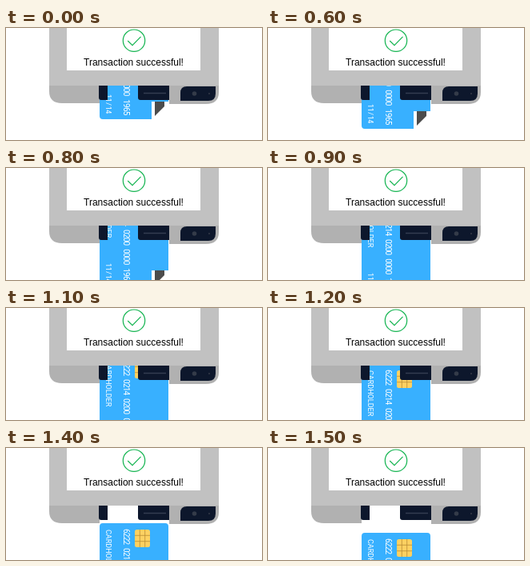
An HTML page that plays this animation: 320x140 px, repeating every 2 s.

```html
<!DOCTYPE html>
<html lang="en">
<head>
<meta charset="utf-8">
<title>Card payment</title>
<style>
  html, body { margin: 0; width: 100%; height: 100%; overflow: hidden; background: #fff; }
  svg { display: block; width: 320px; height: 140px; }
  .message { font: 12px "Liberation Sans", Arial, sans-serif; }
  .print { fill: #fff; font-family: Roboto, sans-serif; }
  .number { font-size: 10px; letter-spacing: -.8px; word-spacing: 3.1px; }
  .label { font-size: 9px; }
  .date { font-size: 9px; letter-spacing: -.4px; word-spacing: -.8px; }
  .card { animation: eject 2s infinite; }
  @keyframes eject {
    0% { transform: translateY(0); }
    30% { transform: translateY(0); animation-timing-function: steps(10, start); }
    80%, 100% { transform: translateY(120px); }
  }
</style>
</head>
<body>
<svg viewBox="0 0 320 140">
  <defs>
    <clipPath id="below"><rect x="110" y="72" width="100" height="68"/></clipPath>
  </defs>

  <!-- lower housing -->
  <g fill="#b1b1b1">
    <path d="M54 72H117V94H70Q54 94 54 79Z"/>
    <path d="M204 72H266V80Q266 95 250 95H204Z"/>
  </g>

  <g clip-path="url(#below)">
    <g class="card">
      <path fill="#4c4c4c" d="M186 92H198V98L186 110Z"/>
      <path fill="#38b0ff" d="M121-14H199Q203-14 203-10V92H182V114H121Q117 114 117 110V-10Q117-14 121-14Z"/>
      <g fill="#fdd162">
        <rect x="161" y="-6" width="19" height="22" rx="2.5"/>
        <path d="M167.3-6V16M173.7-6V16M161 1.3H180M161 8.7H180" stroke="#b98f35" stroke-width=".8"/>
      </g>
      <g class="print">
        <text class="number" transform="translate(146.8 -7) rotate(90)">6222 0214 0200 0000 1965</text>
        <text class="label" transform="translate(125.3 -6) rotate(90)">CARDHOLDER</text>
        <text class="date" transform="translate(125.3 83) rotate(90)">11 / 14</text>
      </g>
    </g>
  </g>

  <!-- slot and reader -->
  <g fill="#0d172c">
    <path d="M116 72H127V90H119Q116 90 116 87Z"/>
    <path d="M165 72H204V90H168Q165 90 165 87Z"/>
    <path d="M226 73H262V82Q262 91 253 91H218V81Q218 73 226 73Z"/>
  </g>
  <path d="M172 81.5H200" stroke="#333c50" stroke-width="1.5"/>
  <circle cx="235.5" cy="82" r="2.8" fill="#343b49"/>
  <circle cx="254" cy="82" r="1" fill="#343b49"/>

  <!-- terminal screen -->
  <rect x="54" width="212" height="72" fill="#c1c1c1"/>
  <rect x="76" width="167" height="53" fill="#fff"/>
  <g fill="none" stroke="#16b552" stroke-width="1.2">
    <circle cx="160" cy="15.7" r="13.7"/>
    <path d="M152.2 16L158 21.6L168.5 10.8"/>
  </g>
  <text class="message" x="97" y="47">Transaction successful!</text>
</svg>
</body>
</html>
```
